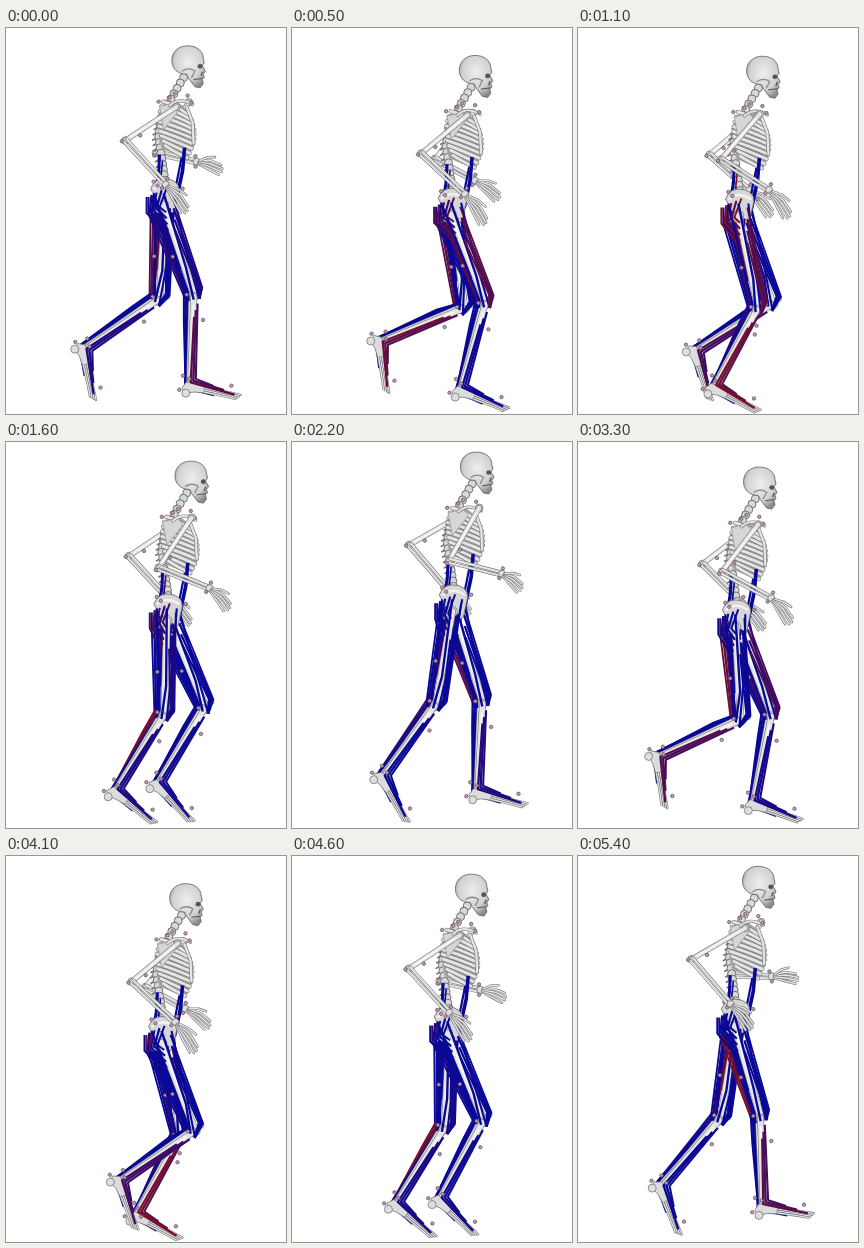
An HTML page that plays this animation: 280x386 px, repeating every 6400 ms.

```html
<!DOCTYPE html>
<html lang="en">
<head>
<meta charset="utf-8">
<title>Running skeleton</title>
<style>
html, body { margin: 0; width: 100%; height: 100%; overflow: hidden; background: #fff; }
svg { display: block; width: 100%; height: 100%; }
</style>
</head>
<body>
<svg viewBox="0 0 280 386">
  <defs>
    <radialGradient id="skull" cx=".5" cy=".4" r=".62">
      <stop offset="0" stop-color="#eee"/>
      <stop offset=".65" stop-color="#d2d2d2"/>
      <stop offset="1" stop-color="#8a8a8a"/>
    </radialGradient>
  </defs>
  <g id="stage" stroke-linejoin="round"></g>
</svg>
<script>
const LOOP = 6400, LAST = 5400, STEP = 100, STRIDE = 5900;
const THIGH = 94, SHANK = 91, FOOT = 50;
const BLUE = [10, 8, 150], RED = [122, 16, 42];
const stage = document.getElementById('stage');

// Joint angles over a stride in degrees: mean, then cosine and sine of each harmonic
const GAIT = {
  thigh: [10, -11.7, 9, -2.5, 6.2, .4, -1.8],
  shank: [-32, -27.4, -4, 3.1, -12.7, .6, -.5],
  foot: [44.5, 34.5, 6.5, .5, 7.4, -1.7, -3.4]
};
// Peaks of muscle activity: [phase, spread]
const ACTIVE = {
  glute: [[3950, 650]], quad: [[3750, 600]], ham: [[250, 450], [2450, 420]],
  add: [[5600, 450], [3700, 500]], calf: [[4650, 450]],
  tib: [[700, 560], [2700, 420], [4100, 350]], hip: []
};

const turns = (t, period = STRIDE) => t / period * 2 * Math.PI;
const angle = (joint, u) => GAIT[joint].reduce((sum, c, i) =>
  sum + c * (i % 2 ? Math.cos : Math.sin)(Math.ceil(i / 2) * turns(u) + (i ? 0 : Math.PI / 2 )), 0) * Math.PI / 180;
const noise = n => { const v = Math.sin(n * 12.9898) * 43758.5453; return v - Math.floor(v); };

const xy = p => p[0].toFixed(1) + ' ' + p[1].toFixed(1);
const poly = pts => 'M' + pts.map(xy).join('L');
const curve = (a, c, b) => `M${xy(a)}Q${xy(c)} ${xy(b)}`;
const line = (d, color, w, cap = 'round') =>
  `<path d="${d}" fill="none" stroke="${color}" stroke-width="${w}" stroke-linecap="${cap}"/>`;
const fill = (d, color, edge = '#777', w = .8) =>
  `<path d="${d}" fill="${color}" stroke="${edge}" stroke-width="${w}"/>`;
const dot = (p, r, color = '#dedede', edge = '#777', w = .8) =>
  `<circle cx="${p[0].toFixed(1)}" cy="${p[1].toFixed(1)}" r="${r}" fill="${color}" stroke="${edge}" stroke-width="${w}"/>`;
const marker = p => dot(p, 1.7, '#c49abb', '#69505f');
const mix = (a, b, k) => a.map((v, i) => v + (b[i] - v) * k);
const tube = (d, w) => line(d, '#777', w) + line(d, '#e4e4e4', w - 1.2);

function bone(a, b, w, knob = w * .66) {
  return dot(a, knob) + dot(b, knob) + tube(poly([a, b]), w) +
    line(poly([mix(a, b, .1), mix(a, b, .9)]), '#f6f6f6', w * .3);
}

// Point along a-b at fraction f, shifted by off towards the front
function along(a, b, f, off) {
  const dx = b[0] - a[0], dy = b[1] - a[1], len = Math.hypot(dx, dy) || 1;
  return [a[0] + dx * f + dy / len * off, a[1] + dy * f - dx / len * off];
}

function activity(group, u) {
  return Math.max(0, ...ACTIVE[group].map(([peak, spread]) => {
    const d = ((u - peak) % STRIDE + STRIDE * 1.5) % STRIDE - STRIDE / 2;
    return Math.exp(-((d / spread) ** 2));
  }));
}
const tint = k => `rgb(${mix(BLUE, RED, Math.min(1, k)).map(Math.round)})`;

// Strands spread evenly; every span is the pair of outer points they pass through
function fan(group, u, n, ...spans) {
  const level = activity(group, u);
  let s = '';
  for (let i = 0; i < n; i++) {
    const vary = noise(i + group.length * 7 + n);
    const pts = spans.map(([p, q]) => mix(p, q, n > 1 ? i / (n - 1) : 0));
    s += line(poly(pts), tint(level * (.6 + .8 * vary)), 1.7 + .7 * noise(i + n * 3), 'butt');
  }
  return s;
}

function leg(hip, u) {
  const th = angle('thigh', u), sh = angle('shank', u), ft = angle('foot', u);
  const knee = [hip[0] + THIGH * Math.sin(th), hip[1] + THIGH * Math.cos(th)];
  const ankle = [knee[0] + SHANK * Math.sin(sh), knee[1] + SHANK * Math.cos(sh)];
  const toe = [ankle[0] + FOOT * Math.cos(ft), ankle[1] + FOOT * Math.sin(ft)];
  const pelvis = (x, y) => [hip[0] + x, hip[1] + y];
  const femur = (f, off) => along(hip, knee, f, off);
  const tibia = (f, off) => along(knee, ankle, f, off);
  const foot = (f, off) => along(ankle, toe, f, off);
  const heel = foot(-.06, -9);

  // Behind the bones
  let s = fan('ham', u, 4, [pelvis(-15, 9), pelvis(-7, 8)], [femur(.98, -10), femur(.98, -5)],
    [tibia(.08, -7), tibia(.12, -3)]);
  s += fan('add', u, 6, [pelvis(6, 3), pelvis(-7, 9)], [femur(.3, -1), femur(.98, -7)]);
  s += fan('calf', u, 3, [femur(.95, -9), femur(.97, -5)], [tibia(.3, -9), tibia(.35, -6)], [heel, heel]);
  s += fan('hip', u, 2, [tibia(.15, -5), tibia(.3, -4)], [foot(-.1, -4), foot(0, -5)], [foot(.5, -5), foot(.9, -2)]);

  // Bones
  s += bone(hip, knee, 7.5, 5.2);
  s += tube(poly([tibia(.04, -4), tibia(.96, -3)]), 2.8);
  s += bone(tibia(.03, 0), ankle, 6.8, 4.6);
  s += dot(femur(.97, 7), 3);
  s += fill(poly([tibia(.97, 4), foot(.35, 3), foot(.45, -4), foot(.1, -6), heel,
    foot(-.16, -5), foot(-.1, 2)]) + 'Z', '#dcdcdc');
  s += dot(heel, 4);
  for (let i = 0; i < 4; i++) {
    s += tube(poly([foot(.3, 2 - i * 2), foot(.74, 1 - i * 1.6), foot(1.02 - i * .03, 1 - i * 1.7)]), 2.4);
  }

  // In front of the bones
  s += fan('glute', u, 5, [pelvis(-17, -8), pelvis(3, -17)], [pelvis(-17, 8), pelvis(-4, 2)], [femur(.33, -5), femur(.08, 0)]);
  s += fan('hip', u, 3, [pelvis(10, -12), pelvis(-10, -12)], [femur(.45, 7), femur(.95, -5)], [tibia(.04, 5), tibia(.08, -5)]);
  s += fan('quad', u, 4, [pelvis(9, -8), femur(.3, 3)], [femur(.96, 10), femur(.94, 6)], [tibia(.05, 6), tibia(.05, 5)]);
  s += fan('tib', u, 3, [tibia(.1, 4), tibia(.25, 1)], [tibia(.93, 5), tibia(.97, 0)], [foot(.45, 4), foot(.9, 0)]);

  return s + [femur(.55, -8), femur(.98, -7), tibia(.28, 10), tibia(.9, -8),
    foot(-.2, -7), foot(-.05, 6), foot(.8, 8)].map(marker).join('');
}

// swing runs from -1 (elbow back) to 1 (hand forward); lift raises the hand on the way forward
function arm(head, swing, lift) {
  const up = lift * (1 + swing), bend = swing * swing;
  const at = (x, y) => [head[0] + x, head[1] + y];
  const sh = at(-6 + 8 * swing, 43 - 3 * swing);
  const el = at(-48 + 20 * swing, 85 + 8 * swing);
  const wr = at(-2 + 27 * swing - 6 * up, 121 - 8 * swing - 7 * bend - 6 * up);
  const tip = at(20 + 26 * swing - 3 * up, 150 - 13 * swing - 17 * bend - 13 * up);

  let s = bone(sh, el, 5.4, 3.8);
  s += tube(poly([along(el, wr, 0, -2), along(el, wr, 1, -2)]), 3.2);
  s += tube(poly([along(el, wr, 0, 2), along(el, wr, 1, 1.5)]), 3.4);
  s += dot(wr, 3.6);
  for (let i = -1.5; i < 2; i++) {
    s += tube(poly([along(wr, tip, .08, i), along(wr, tip, .5, i * 3),
      along(wr, tip, 1 - Math.abs(i) * .08, i * 3.3 - 2)]), 2.7);
  }
  s += tube(poly([along(wr, tip, .1, 2), along(wr, tip, .35, 7), along(wr, tip, .6, 9)]), 2.6);
  return s + [along(el, wr, -.03, -3), along(sh, el, .75, 4), along(wr, tip, -.1, 5),
    along(wr, tip, 0, -5)].map(marker).join('');
}

function skull([x, y]) {
  return `<g transform="translate(${x.toFixed(1)} ${y.toFixed(1)}) scale(1.05)">` +
    fill('M-16-1c0-9 7-14 15-14c9 0 15 5 15 12l1 4-2 3 3 5-2 3 1 3-2 2 1 4-3 4-5-1-6-8-2-4c-8 0-14-5-14-13z',
      'url(#skull)', '#666') +
    '<ellipse cx="11" cy="4.5" rx="2.4" ry="2.2" fill="#555"/>' +
    line('M13 10l-1 3', '#555', 1.2) + line('M5 17l8-1', '#555', 1) +
    line('M-6 9q6-4 12 0l-3 6', '#8a8a8a', 1.2) + '</g>';
}

function torso(head, t) {
  // Points are given for a head resting at 184, 31
  const at = (x, y) => [x + head[0] - 184, y + head[1] - 31];
  const path = (...pts) => poly(pts.map(p => at(...p)));
  const bow = (...pts) => curve(...pts.map(p => at(...p)));
  let s = '';

  // Spine
  for (let i = 0; i < 21; i++) {
    const k = i / 20;
    const p = at(179 - 25 * Math.sin(Math.min(1, k * 1.7) * 1.57) + 16 * Math.max(0, k - .55), 47 + 108 * k);
    s += line(poly([p, [p[0] - 6, p[1] + 3]]), '#777', 1.8) + dot(p, 4, '#d8d8d8', '#666', .9);
  }

  // Rib cage
  s += fill(bow([172, 71], [194, 84], [190, 114]) + 'L' + xy(at(183, 129)) + 'L' + xy(at(157, 118)) +
    `Q${xy(at(147, 92))} ${xy(at(172, 71))}Z`, '#a6a6a6', 'none');
  for (let i = 0; i < 10; i++) {
    const w = Math.sin((i + 2) / 12 * Math.PI);
    s += tube(bow([163 - 9 * w, 71 + 4.9 * i], [169, 73 + 5.3 * i], [180 + 10 * w, 85 + 4.7 * i]), 4.2);
  }
  s += tube(path([182, 76], [188, 92], [189, 113]), 3.6);
  s += fill(path([155, 76], [170, 72], [175, 79], [164, 93], [159, 99]) + 'Z', '#d6d6d6', '#999');
  s += tube(bow([165, 75], [175, 66], [188, 74]), 3.2);

  // Muscles from ribs to pelvis
  const blue = tint(0);
  s += line(path([180, 117], [178, 140], [172, 168]), blue, 3.6, 'butt');
  s += line(path([177, 127], [169, 167]), blue, 2.2, 'butt');
  s += line(path([155, 124], [154, 142], [151, 160]), blue, 3, 'butt');
  s += line(path([158, 130], [155, 160]), tint(activity('glute', t + STRIDE / 2)), 1.6, 'butt');

  // Pelvis
  s += fill(bow([146, 158], [151, 145], [166, 149]) + `Q${xy(at(178, 153))} ${xy(at(173, 167))}L` +
    [[170, 181], [160, 184], [151, 181], [153, 171]].map(p => xy(at(...p))).join('L') + 'Z', '#d6d6d6', '#666');
  s += line(bow([150, 158], [160, 150], [171, 158]), '#f2f2f2', 2.4);

  return s + [[154, 71], [165, 67], [170, 63], [183, 65], [187, 72], [149, 151],
    [153, 155], [178, 158]].map(p => marker(at(...p))).join('');
}

function draw(t) {
  const head = [183 + 2.8 * Math.cos(turns(t - 1600)), 35.6 + 10 * Math.cos(turns(t - 830, STRIDE / 2))];
  const hip = [head[0] - 24, head[1] + 143.5];
  const swing = Math.cos(turns(t - 2300));
  stage.innerHTML =
    arm(head, -swing, 1) + leg([hip[0] + 1, hip[1]], t) +
    torso(head, t) + skull(head) +
    leg([hip[0] - 1, hip[1]], t + STRIDE / 2) + arm(head, swing, 0);
}

let shown = -1;
function tick(now) {
  const t = Math.min(LAST, Math.floor(now % LOOP / STEP) * STEP);
  if (t !== shown) draw(shown = t);
  requestAnimationFrame(tick);
}
draw(0);
requestAnimationFrame(tick);
</script>
</body>
</html>
```
